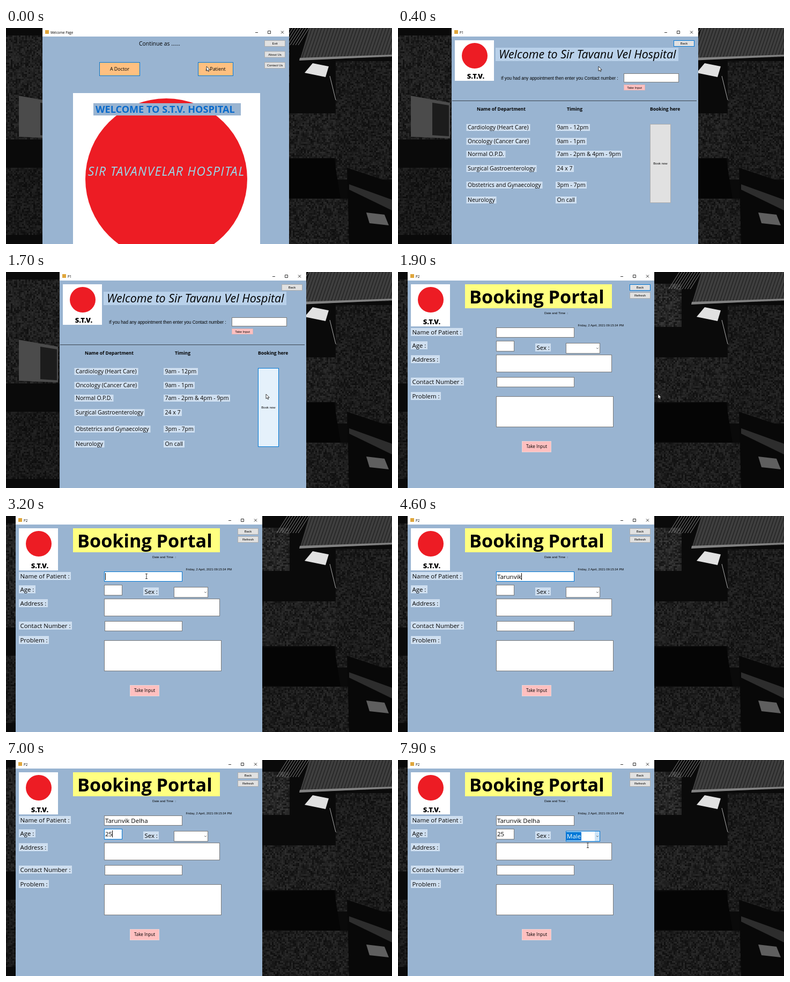
Write an HTML page with a canvas that moves like this. It is 720 by 405 pixels and loops after 8 s.

```html
<!DOCTYPE html>
<html lang="en">
<head>
<meta charset="utf-8">
<title>Hospital booking</title>
<style>
html, body { margin: 0; width: 720px; height: 405px; overflow: hidden; background: #111; }
canvas, svg { position: absolute; left: 0; top: 0; display: block; }
text { white-space: pre; }
</style>
</head>
<body>
<canvas id="wall" width="720" height="405"></canvas>
<svg id="stage" width="720" height="405" viewBox="0 0 720 405"></svg>
<script>
const LOOP = 8000, STEP = 100;
const UI = '"Open Sans", "Noto Sans", sans-serif';
const ARIAL = '"Liberation Sans", Arial, sans-serif';
const BLUE = '#99b4d1', FOCUS = '#0078d7', EDGE = '#7a7a7a', GREY = '#adadad';
const PALE = '#cfdff0', PINK = '#ffc0c0', PEACH = '#ffc080', RED = '#ed1c24';
const BOLD = { 'font-weight': 700 }, MIDDLE = { 'text-anchor': 'middle' }, SMALL = { 'font-family': ARIAL };

// ---- dark brick backdrop ----
const ctx = document.getElementById('wall').getContext('2d');
let seed = 7;
const rnd = () => (seed = (seed * 16807) % 2147483647) / 2147483647;
const tone = v => `rgb(${v},${v},${v})`;

function poly(v, ...p) {
  ctx.beginPath();
  for (let i = 0; i < p.length; i += 2) ctx.lineTo(p[i], p[i + 1]);
  ctx.closePath();
  ctx.fillStyle = tone(v);
  ctx.fill();
}

function bricks(x, y, w, h, v) {
  for (let i = 0; i < w; i += 3) {
    for (let j = 0; j < h; j += 3) {
      ctx.fillStyle = tone(Math.round(v * (0.5 + rnd())));
      ctx.fillRect(x + i, y + j, 3, 3);
    }
  }
}

// n slats from (x, y), each leaning by (lx, ly)
function slats(n, v, x, y, gap, lx, ly) {
  ctx.strokeStyle = tone(v);
  ctx.beginPath();
  for (let i = 0; i < n; i++) {
    ctx.moveTo(x + i * gap, y);
    ctx.lineTo(x + i * gap + lx, y + ly);
  }
  ctx.stroke();
}

function drawWall() {
  poly(10, 0, 0, 720, 0, 720, 405, 0, 405);
  bricks(0, 14, 100, 195, 30);
  bricks(0, 262, 100, 126, 24);
  poly(75, 24, 127, 97, 140, 97, 207, 24, 204);
  poly(28, 64, 140, 95, 145, 95, 203, 64, 201);

  bricks(478, 22, 51, 80, 38);
  bricks(478, 160, 138, 84, 30);
  bricks(615, 62, 105, 220, 27);
  bricks(478, 320, 160, 85, 28);
  slats(9, 130, 505, 32, 5, 20, -32);
  poly(62, 566, 0, 720, 0, 720, 54, 548, 60);
  slats(30, 24, 571, 0, 6, -19, 56);
  poly(130, 548, 56, 720, 50, 720, 53, 547, 61);
  poly(225, 557, 84, 572, 66, 602, 72, 596, 92);
  slats(1, 170, 604, 90, 0, 11, 45);
  poly(5, 478, 247, 612, 244, 624, 320, 478, 318);
  poly(8, 636, 262, 720, 290, 720, 405, 640, 405);
  poly(45, 640, 293, 720, 322, 720, 342, 640, 303);
  poly(95, 672, 346, 706, 350, 714, 370, 678, 366);
}

// ---- window parts ----
const stage = document.getElementById('stage');

function el(tag, attrs, parent) {
  const n = document.createElementNS('http://www.w3.org/2000/svg', tag);
  for (const k in attrs) n.setAttribute(k, attrs[k]);
  parent.appendChild(n);
  return n;
}
const group = parent => el('g', {}, parent);
const set = (n, k, v) => n.setAttribute(k, v);
const show = (n, on) => set(n, 'visibility', on ? 'inherit' : 'hidden');

function rect(g, x, y, w, h, fill, stroke) {
  return stroke
    ? el('rect', { x: x + 0.5, y: y + 0.5, width: w - 1, height: h - 1, fill, stroke }, g)
    : el('rect', { x, y, width: w, height: h, fill }, g);
}

function text(g, x, y, size, str, more) {
  const n = el('text', { x, y, 'font-size': size, 'font-family': UI, fill: '#000', ...more }, g);
  n.textContent = str;
  return n;
}

// tinted box that hugs its text
function label(g, x, y, size, str) {
  const h = Math.round(size * 1.28);
  const box = rect(g, x, y, 0, h, PALE);
  const t = text(g, x + 2.5, y + h / 2 + size * 0.36, size, str);
  set(box, 'width', Math.round(t.getComputedTextLength() + 5));
}

function button(g, x, y, w, h, str, fill = '#e1e1e1', stroke = GREY, size = 6, font = ARIAL) {
  const box = rect(g, x, y, w, h, fill, stroke);
  text(g, x + w / 2, y + h / 2 + size * 0.36, size, str, { ...MIDDLE, 'font-family': font });
  return box;
}

const sideButton = (g, right, y, str) => button(g, right - 46, y, 39, 12, str);

function windowAt(x, title) {
  const g = group(stage), r = x + 460;
  rect(g, x, 0, 460, 405, BLUE);
  rect(g, x, 0, 460, 16, '#fff');
  rect(g, x + 5, 4, 7, 7, '#e0a63c');
  text(g, x + 15, 10.6, 6.2, title);
  el('path', {
    d: `M${r - 63} 8.5h5M${r - 39.5} 5.5h5v5h-5zM${r - 15} 5.5l5 5m0 -5l-5 5`,
    fill: 'none', stroke: '#222', 'stroke-width': 0.9
  }, g);
  return g;
}

function badge(g, x, h) {
  rect(g, x, 23, 73, h, '#fff');
  el('circle', { cx: x + 37, cy: 52, r: 24, fill: RED }, g);
  text(g, x + 39, 18.5 + h, 13, 'S.T.V.', { ...MIDDLE, 'font-weight': 800 });
}

// ---- pages ----
function buildWelcome() {
  const g = windowAt(68, 'Welcome Page');
  text(g, 248, 33, 10.4, 'Continue as ......');
  button(g, 174, 64, 76, 26, 'A Doctor', PEACH, FOCUS, 8.9, UI);
  button(g, 358, 64, 66, 26, 'A Patient', PEACH, FOCUS, 8.9, UI);
  ['Exit', 'About Us', 'Contact Us'].forEach((s, i) => sideButton(g, 528, 23 + i * 20.5, s));
  rect(g, 125, 122, 349, 283, '#fff');
  el('circle', { cx: 299, cy: 283, r: 151, fill: RED }, g);
  rect(g, 163, 141, 275, 23, BLUE);
  text(g, 167, 159, 18.1, 'WELCOME TO S.T.V. HOSPITAL', { ...BOLD, fill: '#0a6acb' });
  text(g, 299, 277, 23, 'SIR TAVANVELAR HOSPITAL',
    { ...MIDDLE, 'font-style': 'italic', 'letter-spacing': 1.3, fill: '#99d9ea' });
  return g;
}

const CLINICS = [
  [180, 'Cardiology (Heart Care)', '9am - 12pm'],
  [206, 'Oncology (Cancer Care)', '9am - 1pm'],
  [230, 'Normal O.P.D.', '7am - 2pm & 4pm - 9pm'],
  [257, 'Surgical Gastroenterology', '24 x 7'],
  [288, 'Obstetrics and Gynaecology', '3pm - 7pm'],
  [316, 'Neurology', 'On call']
];
const BOOK = [470, 180, 39, 148];

function buildClinics() {
  const g = windowAt(100, 'P1');
  badge(g, 106, 76);
  rect(g, 182, 37, 341, 25, '#b9d1ea');
  text(g, 188, 57, 21.5, 'Welcome to Sir Tavanu Vel Hospital', { 'font-style': 'italic' });
  text(g, 192, 97, 8.2, 'If you had any appointment then enter you Contact number :', SMALL);
  rect(g, 421, 85, 103, 17, '#fff', EDGE);
  button(g, 421, 106, 40, 11, 'Take Input', PINK, '#d9b4b8');
  rect(g, 101, 136, 456, 1, '#39434e');
  text(g, 147, 155, 8.55, 'Name of Department', BOLD);
  text(g, 315, 155, 8.55, 'Timing', BOLD);
  text(g, 470, 155, 8.55, 'Booking here', BOLD);
  for (const [y, name, hours] of CLINICS) {
    label(g, 127.5, y, 10.5, name);
    label(g, 294, y, 10.5, hours);
  }
  g.back = sideButton(g, 560, 23, 'Back');
  g.book = button(g, ...BOOK, 'Book now');
  return g;
}

const FIELDS = {
  name: [183, 104, 146, 19],
  age: [183, 129, 34, 20],
  sex: [313, 133, 64, 20],
  address: [183, 155, 216, 33],
  contact: [184, 197, 145, 19],
  problem: [183, 233, 219, 58]
};
const PROMPTS = {
  name: 'Name of Patient :', age: 'Age :', sex: 'Sex :',
  address: 'Address :', contact: 'Contact Number :', problem: 'Problem :'
};

function picked(g, y) {
  const row = group(g);
  rect(row, 314, y, 28, 16, FOCUS);
  text(row, 315, y + 12, 11.5, 'Male', { fill: '#fff' });
  return row;
}

function buildBooking() {
  const g = windowAt(18, 'P2');
  badge(g, 24, 79);
  rect(g, 125, 23, 274, 45, '#ffff80');
  text(g, 133, 58.5, 34.2, 'Booking Portal', BOLD);
  text(g, 273, 79, 6, 'Date and Time  :', SMALL);
  text(g, 335.5, 102, 5.8, 'Friday, 2 April, 2021 09:15:34 PM', SMALL);
  g.back = sideButton(g, 478, 23, 'Back');
  sideButton(g, 478, 38, 'Refresh');
  g.box = {};
  for (const k in FIELDS) {
    const y = FIELDS[k][1] + (k === 'problem' ? -8 : 1);
    label(g, k === 'sex' ? 256 : 24, y, 11.4, PROMPTS[k]);
    g.box[k] = rect(g, ...FIELDS[k], '#fff', EDGE);
  }
  g.arrow = rect(g, 367, 134, 9, 18, '#fff');
  el('path', { d: 'M370 142l2 2l2 -2', fill: 'none', stroke: '#555', 'stroke-width': 0.8 }, g);
  g.name = text(g, 185, 118, 11.5, '');
  g.age = text(g, 185, 143, 11.5, '');
  g.caret = rect(g, 0, 0, 1, 13, '#000');
  g.male = picked(g, 135);
  g.list = group(g);
  rect(g.list, 313, 152, 64, 18, FOCUS);
  picked(g.list, 153);
  button(g, 231, 317, 55, 21, 'Take Input', PINK, '#e9d5d8', 8.1, UI);
  return g;
}

drawWall();
const welcome = buildWelcome(), clinics = buildClinics(), booking = buildBooking();
const pages = [welcome, clinics, booking];

const arrow = el('path', {
  d: 'M0 0V8.6L2 6.8L3.4 9.8L4.8 9.2L3.5 6.3H6.2Z',
  fill: '#fff', stroke: '#111', 'stroke-width': 0.8
}, stage);
const beam = el('path', { d: 'M-2 -4.5h4M0 -4.5v9M-2 4.5h4', fill: 'none', stroke: '#222', 'stroke-width': 0.9 }, stage);

// ---- motion ----
// each move: start, duration, destination
const MOVES = [
  [600, 900, 485, 229], [2100, 800, 262, 113], [6300, 300, 203, 140],
  [7050, 350, 371, 143], [7500, 300, 354, 160]
];

function pointer(t) {
  let x = 374, y = 72;
  for (const [t0, d, tx, ty] of MOVES) {
    const k = Math.min(1, Math.max(0, (t - t0) / d)), e = k * k * (3 - 2 * k);
    x += (tx - x) * e;
    y += (ty - y) * e;
  }
  return [x, y];
}

const between = (t, a, b) => t >= a && t < b;
const inside = (x, y, [bx, by, w, h]) => between(x, bx, bx + w) && between(y, by, by + h);
const typed = (str, t, t0, gap) => str.slice(0, Math.max(0, Math.floor((t - t0) / gap) + 1));

function drawBooking(t) {
  const focus = t < 3100 ? 'back' : t < 5900 ? 'name' : t < 6600 ? 'address' : t < 7400 ? 'age' : 'sex';
  for (const k in booking.box) set(booking.box[k], 'stroke', k === focus ? FOCUS : EDGE);
  if (between(t, 5900, 6200)) set(booking.box.name, 'stroke', '#333');
  set(booking.back, 'stroke', focus === 'back' ? FOCUS : GREY);
  booking.name.textContent = typed('Tarunvik', t, 3500, 140) + typed(' Delha', t, 4800, 130);
  booking.age.textContent = typed('25', t, 6800, 200);

  const field = booking[focus], editing = focus === 'name' || focus === 'age';
  const typing = between(t, 3500, 5500) || between(t, 6800, 7100);
  show(booking.caret, editing && (typing || t % 1060 < 530));
  if (editing) {
    set(booking.caret, 'x', Math.round(185 + (field.textContent ? field.getComputedTextLength() : 0)));
    set(booking.caret, 'y', FIELDS[focus][1] + 3);
  }
  set(booking.arrow, 'fill', focus === 'sex' ? '#cce4f7' : '#fff');
  show(booking.list, between(t, 7500, 7800));
  show(booking.male, t >= 7800);
}

function draw(t) {
  const page = t < 300 ? welcome : t < 1900 ? clinics : booking;
  pages.forEach(p => set(p, 'visibility', p === page ? 'visible' : 'hidden'));
  const [x, y] = pointer(t);

  const over = inside(x, y, BOOK);
  set(clinics.back, 'stroke', t >= 1600 ? GREY : FOCUS);
  set(clinics.book, 'fill', over ? '#e5f1fb' : '#e1e1e1');
  set(clinics.book, 'stroke', over ? FOCUS : GREY);
  drawBooking(t);

  const hidden = between(t, 3500, 6300) || between(t, 6800, 7050);
  const onField = page === booking && !between(t, 7500, 7800) &&
    Object.keys(FIELDS).some(k => k !== 'sex' && inside(x, y, FIELDS[k]));
  for (const c of [arrow, beam]) {
    set(c, 'transform', `translate(${x.toFixed(1)} ${y.toFixed(1)})`);
    show(c, !hidden && (c === beam) === onField);
  }
}

const start = performance.now();
function tick() {
  const t = (performance.now() - start) % LOOP;
  draw(Math.floor(t / STEP) * STEP);
  requestAnimationFrame(tick);
}
tick();
</script>
</body>
</html>
```
